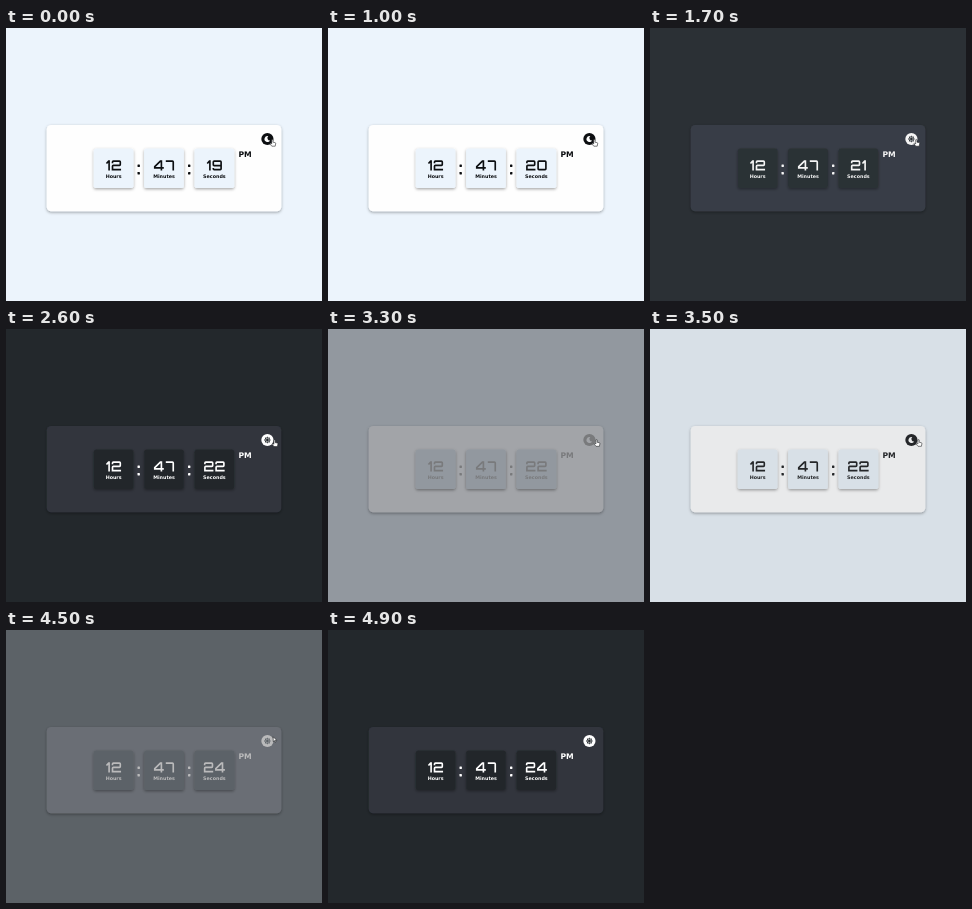
An HTML page for the animation above (5 s loop, 316 by 273 pixels).

```html
<!DOCTYPE html>
<html lang="en">
<head>
<meta charset="utf-8">
<title>Digital clock</title>
<style>
  html, body { margin: 0; width: 100%; height: 100%; overflow: hidden; }
  svg { display: block; width: 100%; height: 100%; }
  text { font-family: "DejaVu Sans", sans-serif; font-weight: bold; fill: var(--ink); }
  .label { font-size: 4.8px; text-anchor: middle; }
  .page { fill: var(--page); }
  .card { fill: var(--card); }
  .ink { fill: var(--ink); }
  .digits { fill: none; stroke: var(--ink); stroke-width: 1.65; }
  .pointer { fill: #fff; stroke: #16181b; stroke-width: .55; stroke-linejoin: round; }
</style>
</head>
<body>
<svg id="stage" viewBox="0 0 316 273">
  <defs>
    <filter id="shadow" x="-20%" y="-20%" width="140%" height="140%">
      <feDropShadow dx="0" dy="1.2" stdDeviation="1.5" flood-color="#000" flood-opacity=".36"/>
    </filter>
  </defs>
  <rect class="page" width="316" height="273"/>
  <rect class="card" x="40.7" y="97" width="234.6" height="86.3" rx="4.5" filter="url(#shadow)"/>
  <g id="tiles"></g>
  <g class="ink" id="colons"></g>
  <text x="232.4" y="128.6" font-size="7.7">PM</text>
  <g transform="translate(261.4 111)">
    <circle class="ink" r="6.1"/>
    <path id="moon" class="card" d="M.9-2.9A3 3 0 1 0 2.7 1.5A2.5 2.5 0 0 1 .9-2.9Z"/>
    <g id="sun">
      <path id="rays" class="page"/>
      <circle r="1.75" fill="none" stroke="var(--ink)" stroke-width=".55"/>
    </g>
  </g>
  <path id="hand" class="pointer"
    d="M-.7 0Q0-.7.6 0V2.4L2.7 2.8Q3.4 3 3.3 3.8L2.8 6.4H-.6L-2.5 4Q-2.3 3-1.3 3.6L-.7 4.1Z"/>
  <path id="arrow" class="pointer" d="M0 0V4.8L1.2 3.8L2 5.4L2.8 5L2.1 3.5H3.5Z"/>
</svg>
<script>
const LOOP = 5000;
const $ = id => document.getElementById(id);

const LIGHT = { page: [236, 244, 252], card: [254, 254, 254], ink: [12, 14, 17] };
const DARK = { page: [35, 40, 44], card: [48, 53, 62], ink: [255, 255, 255] };

// Theme switches: start, duration, target darkness
const SWITCHES = [[1328, 500, 1], [3090, 660, 0], [4285, 510, 1]];
const TICKS = [400, 1450, 2600, 3600, 4450];
// Pointer positions: time, x, y
const MOVES = [[0, 266.4, 111.8], [2600, 268.6, 111.2], [2800, 268.6, 110.9], [4200, 268.8, 109.3]];

// Wide, squared numerals: [width, path]
const GLYPHS = {
  0: [9.5, 'M1.7.85H7.8Q8.65.85 8.65 1.7V8.5Q8.65 9.35 7.8 9.35H1.7Q.85 9.35.85 8.5V1.7Q.85.85 1.7.85Z'],
  1: [3.9, 'M.4 3.2L2.6.85H3.05V10.2'],
  2: [9.5, 'M.85 2.9V1.7Q.85.85 1.7.85H7.8Q8.65.85 8.65 1.7V4.2Q8.65 5.1 7.8 5.1H1.7Q.85 5.1.85 6V9.35H9.4'],
  3: [9.5, 'M.85 2.7V1.7Q.85.85 1.7.85H7.6Q8.5.85 8.5 1.7V4.2Q8.5 5.1 7.6 5.1H2.4M7.6 5.1Q8.65 5.1 8.65 6V8.5Q8.65 9.35 7.8 9.35H1.7Q.85 9.35.85 8.5V7.5'],
  4: [10, 'M7.5 10.2V.85H6.5L.85 6.3V7.6H9.9'],
  7: [8.5, 'M.2.85H6.8Q7.65.85 7.65 1.7V10.2'],
  9: [9.5, 'M8.65 5.3H1.7Q.85 5.3.85 4.4V1.7Q.85.85 1.7.85H7.8Q8.65.85 8.65 1.7V8.5Q8.65 9.35 7.8 9.35H1.7Q.85 9.35.85 8.5V7.8'],
};

function numeral(value) {
  const gap = 1.7;
  let x = 0;
  const marks = [...String(value)].map(c => {
    const [width, d] = GLYPHS[c];
    const mark = `<path transform="translate(${x} 0)" d="${d}"/>`;
    x += width + gap;
    return mark;
  }).join('');
  return `<g transform="translate(${(gap - x) / 2} 0)">${marks}</g>`;
}

$('tiles').innerHTML = [['Hours', 12], ['Minutes', 47], ['Seconds', 19]].map(([name, value], i) =>
  `<g transform="translate(${107.6 + i * 50.4} 120.6)">
    <rect class="page" x="-19.9" width="39.8" height="39.4" rx="2.6" filter="url(#shadow)"/>
    <g class="digits" id="${name}" role="img" aria-label="${value}" transform="translate(0 11.7)">${numeral(value)}</g>
    <text class="label" y="29.9">${name}</text>
  </g>`).join('');

$('colons').innerHTML = [132.7, 183.2].map(x => [137.8, 145.2].map(y =>
  `<rect x="${x - 1.2}" y="${y - 1.2}" width="2.4" height="2.4" rx=".4"/>`).join('')).join('');

$('rays').setAttribute('d', 'M' + Array.from({ length: 16 }, (_, i) => {
  const r = i % 2 ? 2.5 : 3.5, a = i * Math.PI / 8;
  return `${(r * Math.cos(a)).toFixed(2)} ${(r * Math.sin(a)).toFixed(2)}`;
}).join('L') + 'Z');

// cubic-bezier(.25, .1, .25, 1)
function ease(x) {
  if (x <= 0 || x >= 1) return x <= 0 ? 0 : 1;
  const curve = (a, b, s) => 3 * a * s * (1 - s) ** 2 + 3 * b * s * s * (1 - s) + s ** 3;
  let lo = 0, hi = 1;
  for (let i = 0; i < 20; i++) {
    const mid = (lo + hi) / 2;
    if (curve(.25, .25, mid) < x) lo = mid; else hi = mid;
  }
  return curve(.1, 1, lo);
}

function show(id, on) {
  $(id).setAttribute('visibility', on ? 'visible' : 'hidden');
}

let shown = 19;
function render(t) {
  let dark = 0, isDark = false;
  for (const [start, span, to] of SWITCHES) {
    if (t < start) break;
    dark += (to - dark) * ease((t - start) / span);
    isDark = to === 1;
  }
  for (const key in LIGHT) {
    const rgb = LIGHT[key].map((v, i) => Math.round(v + (DARK[key][i] - v) * dark));
    $('stage').style.setProperty('--' + key, `rgb(${rgb})`);
  }
  show('moon', !isDark);
  show('sun', isDark);

  const seconds = 19 + TICKS.filter(tick => t >= tick).length;
  if (seconds !== shown) {
    shown = seconds;
    $('Seconds').innerHTML = numeral(seconds);
    $('Seconds').setAttribute('aria-label', seconds);
  }

  const [, x, y] = MOVES.filter(m => t >= m[0]).pop();
  $('hand').setAttribute('transform', `translate(${x} ${y})`);
  $('arrow').setAttribute('transform', 'translate(267.2 106.8)');
  show('hand', t < 4450);
  show('arrow', t >= 4450 && t < 4580);
}

const begin = performance.now();
function frame() {
  render((performance.now() - begin) % LOOP);
  requestAnimationFrame(frame);
}
frame();
</script>
</body>
</html>
```
